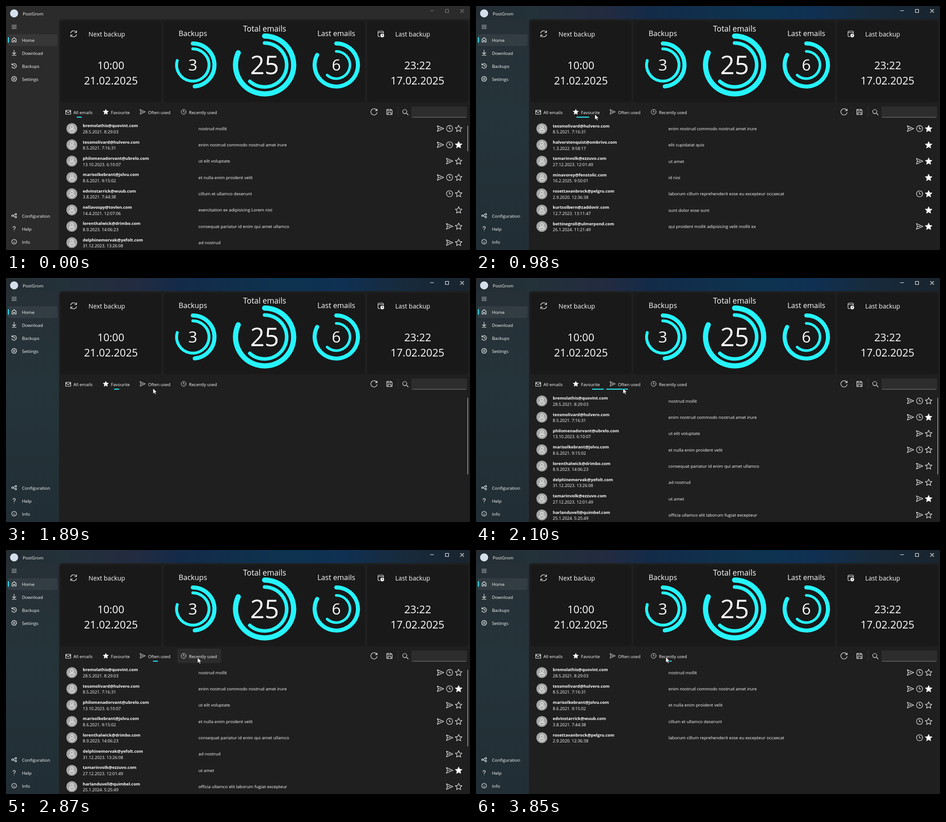
These frames come from a looping animation (1029x544 px, 3920 ms). An HTML page:

```html
<!DOCTYPE html>
<html lang="en">
<head>
<meta charset="utf-8">
<title>PostGrom</title>
<style>
  html, body { margin: 0; width: 100%; height: 100%; overflow: hidden; background: #1f1f1f; }
  svg { display: block; width: 100vw; height: 100vh; }
  text { font: 9.6px "Open Sans", "Noto Sans", sans-serif; fill: #fff; }
  .nav { font-size: 9.85px; }
  .mail { font-weight: 700; font-size: 9.25px; }
  .date { font-size: 9.35px; }
  .head { font-size: 13.9px; }
  .ringHead { font-size: 16.2px; }
  .when { font-size: 23.4px; }
  .mid { text-anchor: middle; }
  .line { fill: none; stroke: #fff; stroke-width: 1.1; stroke-linecap: round; stroke-linejoin: round; }
  .ring { fill: none; stroke: #26f4ff; stroke-linecap: round; }
</style>
</head>
<body>
<svg id="stage" viewBox="0 0 1029 544" preserveAspectRatio="none">
  <defs>
    <linearGradient id="titleTint">
      <stop offset="0" stop-color="#252d33"/>
      <stop offset=".12" stop-color="#233139"/>
      <stop offset=".28" stop-color="#232b40"/>
      <stop offset=".38" stop-color="#122b49"/>
      <stop offset=".6" stop-color="#0e3350"/>
      <stop offset=".73" stop-color="#0f3052"/>
      <stop offset=".84" stop-color="#172b3e"/>
      <stop offset="1" stop-color="#19242d"/>
    </linearGradient>
    <linearGradient id="sideTint" x2="0" y2="1">
      <stop offset="0" stop-color="#262f36"/>
      <stop offset=".45" stop-color="#25343a"/>
      <stop offset="1" stop-color="#212e35"/>
    </linearGradient>
    <clipPath id="tabClip"></clipPath>
    <g id="send" class="line"><path d="M-7-6.3L7.3 0L-7 6.3L-4.8 0ZM-4.8 0H1.5"/></g>
    <g id="clock" class="line"><circle r="6.8"/><path d="M-.5-4V.5H3"/></g>
    <path id="star"/>
    <g id="person">
      <circle r="12" fill="#a8a8a8"/>
      <g class="line"><circle cy="-3.2" r="3.2"/><path d="M-5.2 2.2H5.2V3.6C5.2 8.6-5.2 8.6-5.2 3.6Z"/></g>
    </g>
  </defs>

  <rect width="1029" height="544" fill="#2b2b2b"/>
  <g id="tint">
    <rect width="118" height="544" fill="url(#sideTint)"/>
    <rect width="1029" height="31" fill="url(#titleTint)"/>
  </g>
  <path d="M117.5 544V36Q117.5 29.5 124 29.5H1029V544Z" fill="#1f1f1f"/>
  <g fill="#191919">
    <rect x="121" y="33.5" width="223.5" height="181" rx="6"/>
    <rect x="349.5" y="33.5" width="446.5" height="181" rx="6"/>
    <rect x="801.5" y="33.5" width="223.5" height="181" rx="6"/>
  </g>

  <circle cx="18" cy="16.5" r="9" fill="#d3e0ec"/>
  <text class="nav" x="37" y="20.7">PostGrom</text>
  <g id="controls" class="line">
    <path d="M941 10.5H948.5M974.5 7.5H981.5V14.5H974.5ZM1008 7.5L1015 14.5M1015 7.5L1008 14.5"/>
  </g>

  <rect x="4" y="63" width="110" height="26" rx="3" fill="#fff" opacity=".06"/>
  <rect x="4" y="69.5" width="2.2" height="12.5" rx="1" fill="#26f4ff"/>
  <g id="nav"></g>
  <path class="line" d="M13 43H23M13 46.5H23M13 50H23" style="stroke-width:.9"/>

  <g class="line">
    <g transform="translate(150 62)"><path d="M-6.5-1.5A6.7 6.7 0 0 1 6-3M6.5-7V-2.7H2.2M6.5 1.5A6.7 6.7 0 0 1-6 3M-6.5 7V2.7H-2.2"/></g>
    <g transform="translate(831 62)"><path d="M-1 6H-4Q-6 6-6 4V-4Q-6-6-4-6H4Q6-6 6-4V-1M-6-2.8H6"/><circle cx="3.5" cy="3.8" r="3.5" fill="#fff"/><path d="M3.3 2V4H5" stroke="#191919"/></g>
  </g>
  <text class="head" x="183" y="67.6">Next backup</text>
  <text class="when mid" x="232.5" y="140.5">10:00</text>
  <text class="when mid" x="232.7" y="174.8">21.02.2025</text>
  <text class="head" x="863.3" y="67.6">Last backup</text>
  <text class="when mid" x="913" y="140.5">23:22</text>
  <text class="when mid" x="912.5" y="174.8">17.02.2025</text>
  <g id="rings"></g>

  <rect id="hover" y="220" height="32" rx="4" fill="#2c2c2c"/>
  <g id="tabs"></g>
  <g clip-path="url(#tabClip)"><rect id="bar" y="246.7" height="2.3" rx="1.1" fill="#26e6f2"/></g>

  <g class="line">
    <path d="M822.5 233A7 7 0 1 0 823 237.5M823 229.5V233.5H819"/>
    <path d="M844.5 230.5H854L856.3 232.8V242H844.5ZM847 230.5V234H853V230.5M847 242V237.5H853.7V242"/>
    <circle cx="884.3" cy="235.3" r="4.6"/><path d="M887.8 238.8L892 243"/>
  </g>
  <path d="M869.5 224V248.5" stroke="#343434"/>
  <rect x="899" y="224" width="123.5" height="24.5" rx="3" fill="#2d2d2d"/>
  <path d="M900.5 248.2H1021" stroke="#8c8c8c" stroke-width=".9"/>

  <g id="lists"></g>
  <rect id="thumb" x="1023.3" y="267" width="1.6" rx=".8" fill="#9c9c9c"/>
  <path id="cursor" d="M0 0V12.2L2.9 9.6L4.8 13.8L6.8 12.9L5 8.8H8.8Z" fill="#fff" stroke="#111" stroke-width=".8"/>
</svg>

<script>
const $ = id => document.getElementById(id);
const LOOP = 3920, STEP = 70, FOCUS = 630;

// Closed outline whose radius depends on the point index
const polar = (count, radius, turn = 0) => 'M' + Array.from({ length: count }, (_, i) => {
  const a = (i + turn) * 2 * Math.PI / count, r = radius(i);
  return (r * Math.sin(a)).toFixed(2) + ' ' + (-r * Math.cos(a)).toFixed(2);
}).join('L') + 'Z';
$('star').setAttribute('d', polar(10, i => i % 2 ? 3.6 : 7.8));

const use = (id, x, y, scale = 1, extra = '') =>
  `<use href="#${id}" transform="translate(${x} ${y}) scale(${scale})" ${extra}/>`;
const star = (x, y, full, scale = 1) =>
  use('star', x, y + .5, scale, `fill="${full ? '#fff' : 'none'}" stroke="#fff" stroke-width="1.1" stroke-linejoin="round"`);

// Side menu: label, centre y, icon path
const gear = polar(32, i => i % 4 < 2 ? 5.8 : 4.7, .5);
const menu = [
  ['Home', 76, 'M-4.5-1L0-5L4.5-1V5H1.5V1H-1.5V5H-4.5Z'],
  ['Download', 105, 'M0-6V3M-3.7-.5L0 3.2L3.7-.5M-4.5 5.5H4.5'],
  ['Backups', 134, 'M-4.5-2.5A5.2 5.2 0 1 1-5 1.5M-5-5.5V-2.3H-1.8M0-2.8V.6H2.6'],
  ['Settings', 163, gear + 'M1.8 0A1.8 1.8 0 1 1-1.8 0A1.8 1.8 0 1 1 1.8 0'],
  ['Configuration', 468, 'M-2.2-.7L1.8-2.6M-2.2.7L1.8 2.6M-2 0A1.8 1.8 0 1 1-5.6 0A1.8 1.8 0 1 1-2 0M5.6-3.2A1.8 1.8 0 1 1 2-3.2A1.8 1.8 0 1 1 5.6-3.2M5.6 3.2A1.8 1.8 0 1 1 2 3.2A1.8 1.8 0 1 1 5.6 3.2'],
  ['Help', 497, 'M-2.5-2.5C-2.5-6 2.6-5.8 2.6-2.6C2.6-.5 0-.4 0 2M0 4.6V4.7'],
  ['Info', 526, 'M5.2 0A5.2 5.2 0 1 1-5.2 0A5.2 5.2 0 1 1 5.2 0M0-.3V2.6M0-2.5V-2.4']
];
$('nav').innerHTML = menu.map(([label, y, d]) =>
  `<path class="line" transform="translate(18 ${y - .5})" d="${d}"/><text class="nav" x="35.4" y="${y + 3.7}">${label}</text>`).join('');

// Rings
const arc = (x, r, width, degrees) => {
  const a = degrees * Math.PI / 180, y = 131.5;
  return `<path class="ring" stroke-width="${width}" d="M${x} ${y - r}A${r} ${r} 0 ${+(degrees > 180)} 1 ${x + r * Math.sin(a)} ${y - r * Math.cos(a)}"/>`;
};
const dial = (x, outer, inner, label, labelY, labelSize, value, valueY, valueSize) =>
  arc(x, ...outer) + arc(x, ...inner) +
  `<text class="ringHead mid" x="${x}" y="${labelY}" style="font-size:${labelSize}px">${label}</text>
   <text class="mid" x="${x}" y="${valueY}" style="font-size:${valueSize}px">${value}</text>`;
$('rings').innerHTML =
  dial(414.3, [48, 9, 175], [36, 6.5, 286], 'Backups', 66.5, 16.2, 3, 144.3, 35) +
  dial(573.5, [64.5, 11.5, 295], [49, 8, 222], 'Total emails', 57.4, 17.3, 25, 152, 56) +
  dial(732.5, [48, 9, 298], [30.3, 5.8, 222], 'Last emails', 66.5, 16.2, 6, 144.3, 35);

// Tabs
const tabs = [
  { label: 'All emails', left: 124, right: 201, textX: 149.5, thumb: 57, has: () => true },
  { label: 'Favourite', left: 207, right: 283.5, textX: 232.8, thumb: 0, has: m => m.flags.includes('f') },
  { label: 'Often used', left: 289, right: 374, textX: 315, thumb: 171, has: m => m.flags.includes('s') },
  { label: 'Recently used', left: 380, right: 477, textX: 405.8, thumb: 0, has: m => m.flags.includes('c') }
];
$('tabClip').innerHTML = tabs.map(t => `<rect x="${t.left}" y="240" width="${t.right - t.left}" height="14"/>`).join('');
$('tabs').innerHTML = tabs.map(t => `<text x="${t.textX}" y="240.6">${t.label}</text>`).join('') +
  '<path class="line" d="M132.5 232.5H143.5V241.2H132.5ZM132.5 234L138 237.5L143.5 234"/>' +
  star(221.3, 236, true, .8) + use('send', 303, 236, .82) + use('clock', 394, 236, .8);

// Mail rows; flags: s sent often, c recent, f favourite
const mails = [
  ['bremolathis@quovint.com', '28.5.2021. 8:29:03', 'nostrud mollit', 'sc'],
  ['tessmolivard@hulvero.com', '8.5.2021. 7:16:31', 'enim nostrud commodo nostrud amet irure', 'scf'],
  ['philomenadorvant@ubrelo.com', '13.10.2023. 6:10:07', 'ut elit voluptate', 's'],
  ['marisolkebrant@jolvu.com', '8.6.2021. 9:15:02', 'et nulla enim proident velit', 'sc'],
  ['edvinstarrick@wuub.com', '3.8.2021. 7:44:38', 'cillum et ullamco deserunt', 'c'],
  ['nellavospy@tovlen.com', '14.4.2021. 12:07:06', 'exercitation ex adipisicing Lorem nisi', ''],
  ['lorenthalwick@drimbo.com', '8.9.2023. 14:06:23', 'consequat pariatur id enim qui amet ullamco', 's'],
  ['delphinemorvak@yefolt.com', '31.12.2023. 13:26:08', 'ad nostrud', 's'],
  ['halvorstenquist@ombrivo.com', '1.3.2022. 9:58:17', 'elit cupidatat quis', 'f'],
  ['tamarinvolk@ezzuvo.com', '27.12.2023. 12:01:49', 'ut amet', 'sf'],
  ['harlanduvell@quimbel.com', '25.1.2024. 5:25:49', 'officia ullamco elit laborum fugiat excepteur', 's'],
  ['minavorey@fenstolic.com', '16.2.2025. 9:50:01', 'id nisi', 'f'],
  ['rosettavanbrock@pelgru.com', '2.9.2020. 12:36:38', 'laborum cillum reprehenderit esse eu excepteur occaecat', 'cf'],
  ['kurtsolbern@zaddovir.com', '12.7.2023. 13:11:47', 'sunt dolor esse sunt', 'f'],
  ['bettinegroll@ulmerpond.com', '26.1.2024. 11:21:49', 'qui proident mollit adipisicing velit mollit ex', 'sf']
].map(([mail, date, subject, flags]) => ({ mail, date, subject, flags }));

const row = (m, i) => {
  const y = +(273.2 + i * 36.33).toFixed(2), recent = m.flags.includes('c');
  return use('person', 146, y) +
    `<text class="mail" x="170.3" y="${y - 2.8}">${m.mail}</text>
     <text class="date" x="170.3" y="${y + 10.8}">${m.date}</text>
     <text x="426.8" y="${y + 3.6}">${m.subject}</text>` +
    (m.flags.includes('s') ? use('send', recent ? 963.5 : 983.7, y) : '') +
    (recent ? use('clock', 983.7, y) : '') + star(1003.8, y, m.flags.includes('f'));
};
$('lists').innerHTML = tabs.map(t => `<g>${mails.filter(t.has).slice(0, 8).map(row).join('')}</g>`).join('');
const lists = [...$('lists').children];

// Motion
const clamp = v => Math.min(1, Math.max(0, v));
const bezier = (x1, y1, x2, y2) => x => {
  if (x <= 0 || x >= 1) return clamp(x);
  const at = (a, b, u) => 3 * u * (1 - u) ** 2 * a + 3 * u * u * (1 - u) * b + u ** 3;
  let lo = 0, hi = 1;
  for (let i = 0; i < 24; i++) {
    const u = (lo + hi) / 2;
    if (at(x1, x2, u) < x) lo = u; else hi = u;
  }
  return at(y1, y2, lo);
};
const easeLate = bezier(.9, .1, 1, .2);
const easeEarly = bezier(.1, .9, .2, 1);
const easeMove = p => p * p * (3 - 2 * p);

// Tab choices and pointer path, each led by its time
const picks = [[-1000, 0], [700, 1], [1890, 2], [3120, 3]];
const path = [
  [70, 517, 508], [490, 230, 262], [560, 234, 247], [630, 255, 242], [770, 257, 241], [910, 257, 241],
  [1260, 320, 245], [1330, 321, 245], [1820, 326, 246], [2380, 326, 246], [2730, 425, 240],
  [3360, 424, 240], [3850, 421, 239]
];

function cursorAt(t) {
  const i = path.findIndex(p => p[0] > t);
  if (i < 0) return path[path.length - 1].slice(1);
  const [t0, x0, y0] = path[Math.max(0, i - 1)], [t1, x1, y1] = path[i];
  const p = easeMove(clamp((t - t0) / (t1 - t0)));
  return [x0 + (x1 - x0) * p, y0 + (y1 - y0) * p];
}

const set = (id, attrs) => { for (const k in attrs) $(id).setAttribute(k, attrs[k]); };

function draw(t) {
  const active = t >= FOCUS;
  set('tint', { opacity: active ? clamp((t - FOCUS + STEP) / 350) : 0 });
  set('controls', { opacity: active ? 1 : .42 });

  const n = picks.filter(p => p[0] <= t).length - 1;
  const [start, current] = picks[n], previous = n ? picks[n - 1][1] : 0;
  const age = t - start;

  const centre = tab => (tab.left + tab.right) / 2;
  const from = centre(tabs[previous]), to = centre(tabs[current]);
  const x0 = from + (to - from) * easeEarly((age - 200) / 400) - 5.7;
  const x1 = from + (to - from) * easeLate(age / 200) + 5.7;
  set('bar', { x: x0, width: x1 - x0 });

  lists.forEach((g, i) => g.style.display = i === current ? '' : 'none');
  lists[current].setAttribute('transform', `translate(0 ${28 * (1 - easeEarly(age / 400))})`);
  lists[current].setAttribute('opacity', clamp(age / 100));
  set('thumb', { height: tabs[current].thumb });

  const [x, y] = cursorAt(t);
  set('cursor', { transform: `translate(${x} ${y})`, visibility: t >= STEP ? 'visible' : 'hidden' });
  const over = active && y < 252 ? tabs.findIndex(tab => x >= tab.left && x <= tab.right) : -1;
  if (over >= 0 && over !== current) set('hover', { x: tabs[over].left, width: tabs[over].right - tabs[over].left, visibility: 'visible' });
  else set('hover', { visibility: 'hidden' });
}

const began = performance.now();
function tick(now) {
  const t = Math.max(0, now - began) % LOOP;
  draw(Math.floor(t / STEP) * STEP);
  requestAnimationFrame(tick);
}
draw(0);
requestAnimationFrame(tick);
</script>
</body>
</html>
```
